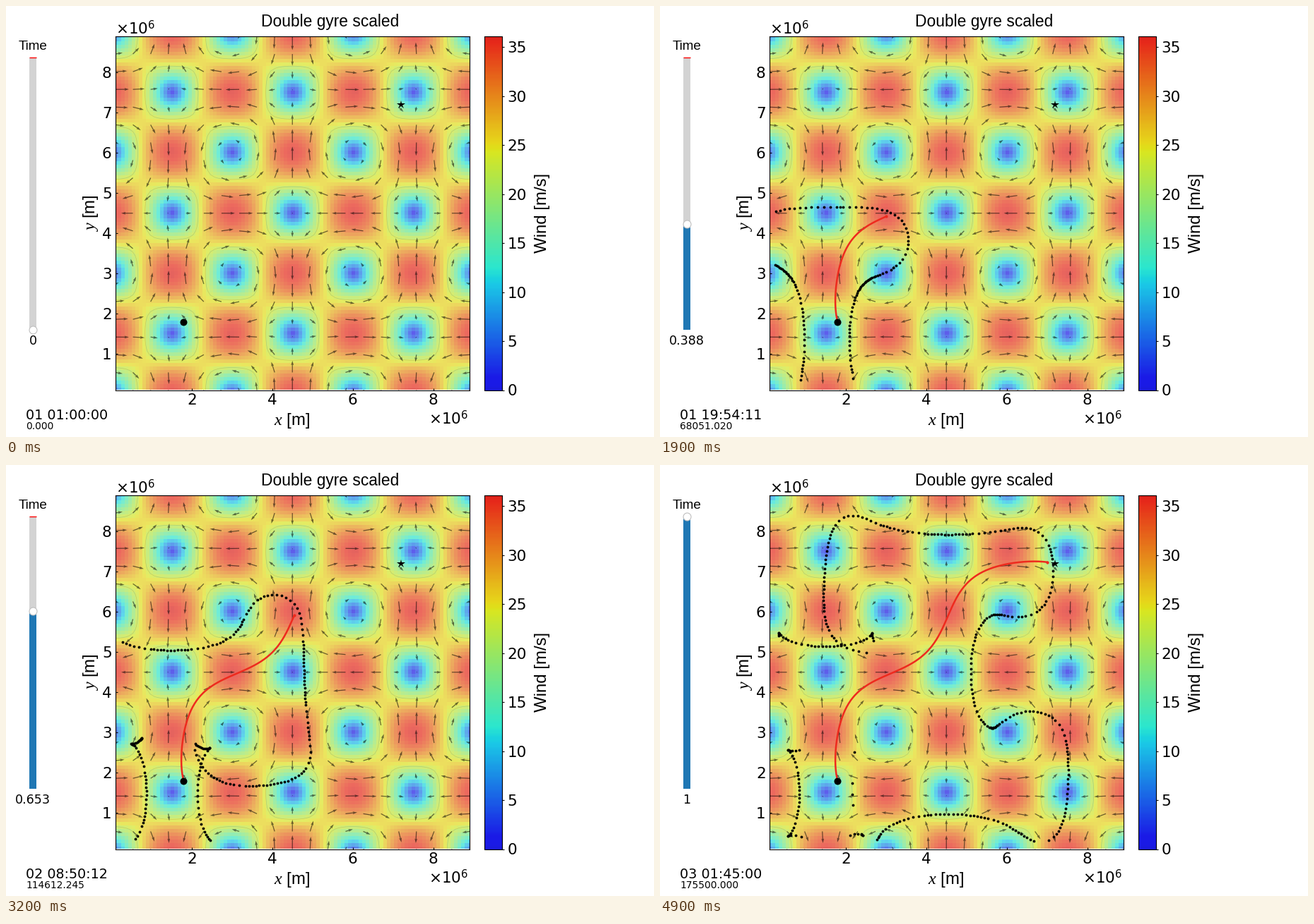
A matplotlib script for the animation above (5000 ms loop, 917x611 px).

```python
import numpy as np
import matplotlib.pyplot as plt
from matplotlib.animation import FuncAnimation
from matplotlib.cm import ScalarMappable
from matplotlib.colors import ListedColormap, Normalize
from matplotlib.patches import Rectangle

W, H, DPI = 917, 611, 100
FRAMES, INTERVAL = 50, 100
DURATION = 175500.0                      # seconds of flight
STEP = DURATION / (FRAMES - 1)
LO, HI = 0.1, 8.9                        # map limits, 1e6 m
WIND_MAX, AIRSPEED = 36.11, 23.0         # m/s
START, GOAL = (1.8, 1.8), (7.2, 7.2)
K = np.pi / 3
A, VA = WIND_MAX * STEP / 1e6, AIRSPEED * STEP / 1e6   # 1e6 m per frame
X_EDGE, Y_EDGE = 0.22, 0.3
SPACING = 0.16
SUBSTEPS = 3

plt.rcParams.update({
    "font.family": "DejaVu Sans", "mathtext.fontset": "custom",
    "mathtext.rm": "DejaVu Sans", "mathtext.it": "Liberation Serif:italic",
})


def wind(x, y, ampl):
    return (ampl * np.cos(K * x) * np.sin(K * y),
            -ampl * np.sin(K * x) * np.cos(K * y))


# --- optimal control: state rows are x, y, heading -------------------------

def slope(s):
    x, y, h = s
    u, v = wind(x, y, A)
    turn = -A * K * (np.cos(K * x) * np.cos(K * y)
                     + np.sin(K * x) * np.sin(K * y) * np.sin(2 * h))
    return np.array([u + VA * np.cos(h), v + VA * np.sin(h), turn])


def advance(s, dt):
    k1 = slope(s)
    k2 = slope(s + dt / 2 * k1)
    k3 = slope(s + dt / 2 * k2)
    k4 = slope(s + dt * k3)
    return s + dt / 6 * (k1 + 2 * k2 + 2 * k3 + k4)


def fan(headings):
    n = len(headings)
    return np.array([np.full(n, START[0]), np.full(n, START[1]), headings])


def best_route(sub=6):
    """Shoot ever narrower fans of headings and keep the one closest to the goal."""
    best = np.radians(75)
    for span in (0.7, 0.02, 0.0006):
        s = fan(best + np.linspace(-span, span, 281))
        track = [s]
        for _ in range(sub * (FRAMES + 1)):
            s = advance(s, 1 / sub)
            track.append(s)
        track = np.array(track)
        gap = np.hypot(track[:, 0] - GOAL[0], track[:, 1] - GOAL[1])
        pick = gap.min(axis=0).argmin()
        best = track[0, 2, pick]
    return track[:, :2, pick], sub


def inside(px, py, x, y):
    """Nonzero winding of the closed polygon x, y around each point."""
    x2, y2 = np.roll(x, -1), np.roll(y, -1)
    px, py = px[:, None], py[:, None]
    side = (x2 - x) * (py - y) - (px - x) * (y2 - y)
    up = (y <= py) & (y2 > py) & (side > 0)
    down = (y > py) & (y2 <= py) & (side < 0)
    return up.sum(1) != down.sum(1)


def refine(s, alive):
    """Add a point midway wherever the front has been stretched."""
    nxt = np.roll(s, -1, axis=1)
    d = nxt[:2] - s[:2]
    dist = np.hypot(*d)
    at = np.flatnonzero((dist > SPACING) & (dist < 4 * SPACING)
                        & alive & np.roll(alive, -1))
    if not len(at):
        return s, alive
    a, b, d, dist = s[:, at], nxt[:, at], d[:, at], dist[at]

    def tangent(h):
        t = np.array([-np.sin(h), np.cos(h)])
        return t * np.sign((t * d).sum(0))

    mid = (a[:2] + b[:2]) / 2 + dist / 8 * (tangent(a[2]) - tangent(b[2]))
    turn = (b[2] - a[2] + np.pi) % (2 * np.pi) - np.pi
    new = np.vstack([mid, a[2] + turn / 2])
    return np.insert(s, at + 1, new, axis=1), np.insert(alive, at + 1, True)


def in_domain(s):
    return (s[0] > X_EDGE) & (s[1] > Y_EDGE) & (s[0] < HI) & (s[1] < HI)


def reach_fronts():
    """Front points for each frame; overtaken points linger only if they hover."""
    s = fan(np.linspace(0, 2 * np.pi, 90, endpoint=False))
    alive = np.ones(s.shape[1], bool)
    stale, origin = np.empty((3, 0)), np.empty((2, 0))
    fronts = [s[:2]]
    for _ in range(FRAMES - 1):
        for _ in range(SUBSTEPS):
            s = np.where(alive, advance(s, 1 / SUBSTEPS), s)
            alive &= in_domain(s)
            s, alive = refine(s, alive)
        stale = advance(stale, 1)
        ahead = s[:2] + 0.05 * np.array([np.cos(s[2]), np.sin(s[2])])
        lost = alive & inside(*ahead, s[0], s[1])
        stale = np.hstack([stale, s[:, lost]])
        origin = np.hstack([origin, s[:2, lost]])
        keep = (np.hypot(*(stale[:2] - origin)) < 0.3) & in_domain(stale)
        stale, origin = stale[:, keep], origin[:, keep]
        s, alive = s[:, ~lost], alive[~lost]
        fronts.append(np.hstack([s[:2, alive], stale[:2]]))
    return fronts


fronts = reach_fronts()
route, route_sub = best_route()

# --- static picture ---------------------------------------------------------

fig = plt.figure(figsize=(W / DPI, H / DPI), dpi=DPI, facecolor="white")


def px_axes(x0, y0, x1, y1):
    return fig.add_axes([x0 / W, 1 - y1 / H, (x1 - x0) / W, (y1 - y0) / H])


def pt(px):
    return px * 72 / DPI


def label(x, y, text, px, font="Liberation Sans", **kw):
    kw = {"va": "baseline", **kw}
    return fig.text(x / W, 1 - y / H, text, size=pt(px), family=font, **kw)


# softened jet without its dark ends
jet = plt.get_cmap("jet")(np.linspace(0.1, 0.9, 256))[:, :3]
cmap = ListedColormap(0.1 + 0.8 * jet)
norm = Normalize(0, WIND_MAX)

ax = px_axes(154.5, 43, 656, 544.5)
grid = np.linspace(LO, HI, 101)
gx, gy = np.meshgrid(grid, grid)
gu, gv = wind(gx, gy, WIND_MAX)
speed = np.hypot(gu, gv)
half = (grid[1] - grid[0]) / 2
ax.imshow(speed, origin="lower", extent=[LO - half, HI + half] * 2, cmap=cmap,
          norm=norm, alpha=0.7, interpolation="nearest", aspect="auto")
ax.contour(gx, gy, speed, [AIRSPEED], colors="#607050", linewidths=0.5, alpha=0.25)
every = slice(None, None, 5)
ax.quiver(gx[every, every], gy[every, every], gu[every, every], gv[every, every],
          color="black", alpha=0.55, width=0.0025)
ax.set(xlim=(LO, HI), ylim=(LO, HI), xticks=range(2, 9, 2), yticks=range(1, 9))
ax.tick_params(direction="in", length=2.5, pad=3.5, labelsize=pt(21.5))

cax = px_axes(676.5, 43, 702, 544.5)
bar = fig.colorbar(ScalarMappable(norm, cmap), cax=cax, ticks=range(0, 36, 5))
bar.ax.tick_params(length=2.5, pad=3, labelsize=pt(21.5))

label(458.5, 29, "Double gyre scaled", 22.7, ha="center")
label(405, 594, "$x$ [m]", 24, ha="center")
label(120, 293.5, "$y$ [m]", 24, rotation=90, ha="center", va="center")
label(759, 293.5, "Wind [m/s]", 24, rotation=90, ha="center", va="center")
label(155, 39, r"$\times 10^6$", 21.5, "DejaVu Sans")
label(654, 592, r"$\times 10^6$", 21.5, "DejaVu Sans", ha="right")

ax.plot(*START, "o", color="black", ms=pt(10), mew=0, zorder=6)
ax.plot(*GOAL, "*", color="black", ms=pt(13), mew=0, zorder=6)

# --- slider -------------------------------------------------------------------

S_TOP, S_BOTTOM, S_X = 73, 458.5, 38
sl = fig.add_axes([0, 0, 1, 1], zorder=-1)
sl.set(xlim=(0, W), ylim=(H, 0))
sl.axis("off")
sl.add_patch(Rectangle((33, S_TOP), 10, S_BOTTOM - S_TOP, fc="lightgrey", lw=0))
fill = sl.add_patch(Rectangle((33, S_BOTTOM), 10, 0, fc="tab:blue", lw=0))
sl.plot([33, 43], [S_TOP, S_TOP], color="red", lw=1, solid_capstyle="butt")
knob, = sl.plot([S_X], [S_BOTTOM], "o", ms=pt(11), mfc="white", mec="0.75", mew=0.8)
label(S_X, 62, "Time", 18.9, ha="center")

# --- moving parts -------------------------------------------------------------

dots, = ax.plot([], [], "o", color="black", ms=pt(3.8), mew=0, zorder=4)
line, = ax.plot([], [], color="#ee2a1e", lw=pt(2.5), zorder=5)
tip, = ax.plot([], [], "o", color="#ee2a1e", ms=pt(4.2), mew=0, zorder=5)
value = label(S_X, 480, "", 17.5, "DejaVu Sans", ha="center")
clock = label(28, 586.5, "", 19.2, "DejaVu Sans")
seconds = label(28, 600.5, "", 13.7, "DejaVu Sans")


def short(v):
    """Fewest decimals that stay within a thousandth."""
    n = next(n for n in range(4) if abs(v - round(v, n)) < 1e-3)
    return f"{v:.{n}f}"


def update(i):
    frac = i / (FRAMES - 1)
    t = frac * DURATION
    dots.set_data(*fronts[i])
    path = route[:max(i - 1, 0) * route_sub + 1] if i else route[:0]
    line.set_data(*path.T)
    tip.set_data(*path[-1:].T)
    y = S_BOTTOM + (S_TOP - S_BOTTOM) * frac
    fill.set_height(y - S_BOTTOM)
    knob.set_ydata([y])
    value.set_text(short(frac))
    total = int(t) + 3600
    day, rest = divmod(total, 86400)
    clock.set_text(f"{day + 1:02d} {rest // 3600:02d}:{rest // 60 % 60:02d}:{rest % 60:02d}")
    seconds.set_text(f"{t:.3f}")
    return dots, line, tip, fill, knob, value, clock, seconds


anim = FuncAnimation(fig, update, frames=FRAMES, interval=INTERVAL,
                     repeat=True, repeat_delay=0, blit=False)
plt.show()
```
